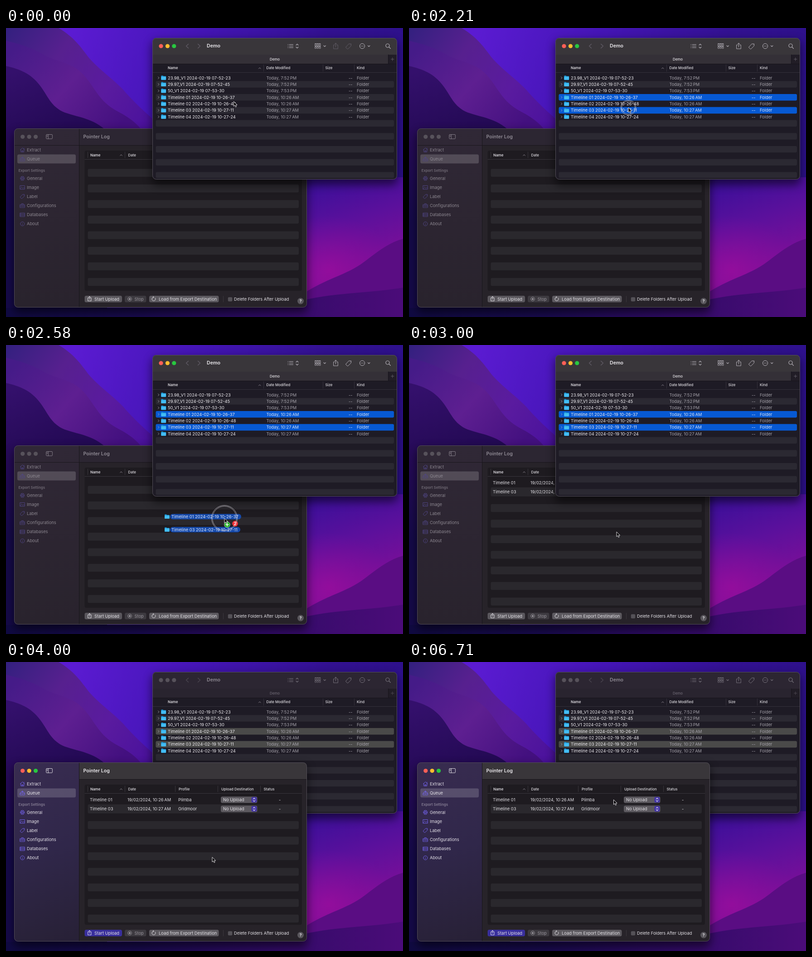
Write an HTML page that moves like this. It is 876 by 639 pixels and loops after 6760 ms.

```html
<!DOCTYPE html>
<html lang="en">
<head>
<meta charset="utf-8">
<title>Drag folders into the queue</title>
<style>
html, body { margin: 0; width: 100%; height: 100%; overflow: hidden; background: #1a0d55; }
svg { display: block; width: 876px; height: 639px; }
text { font-family: Inter, "Open Sans", sans-serif; font-size: 9.3px; white-space: pre; }
.h { font-size: 7.9px; font-weight: 500; fill: #dedce1; }
.b { font-weight: 600; }
.ln { fill: none; stroke-linecap: round; stroke-linejoin: round; }

.win { --title: #8f8a94; --bar: #2c2632; --r: #57525b; --y: #57525b; --g: #57525b; }
.win.on { --title: #eceaee; --bar: #39363a; --r: #fe5f57; --y: #febc2e; --g: #28c840; }
.title { fill: var(--title); font-weight: 600; font-size: 10.6px; }

.finder { --tool: #77727c; --dim: #4c4751; --tab: #6b6671; --tabbar: #29242f; --pick: #4a4a49; }
.finder.on { --tool: #b5b1b9; --dim: #615c66; --tab: #e6e4e8; --tabbar: #343037; --pick: #0759d3; }
.act { stroke: var(--dim); }
.picked .act { stroke: var(--tool); }
.pick { fill: var(--pick); visibility: hidden; }
.sel .pick { visibility: visible; }
.finder.on .sel .meta { fill: #d5e3fb; }
.meta { fill: #a5a2aa; }

.app { --side: url(#sideOff); --item: #8c8790; --icon: #514787; --btn: #5a575d; --rule: #19161c; --head: #706a75; }
.app.on { --side: url(#sideOn); --item: #e6e3ea; --icon: #7565f2; --btn: #392f9d; --rule: transparent; --head: #857d93; }
.icon { stroke: var(--icon); stroke-width: .9; }
</style>
</head>
<body>
<script>
(() => {
const LOOP = 6760;
const NS = 'http://www.w3.org/2000/svg';

function el(parent, tag, attrs = {}, content) {
  const node = document.createElementNS(NS, tag);
  for (const k in attrs) node.setAttribute(k, attrs[k]);
  if (content !== undefined) node.textContent = content;
  parent.append(node);
  return node;
}
const group = (p, cls = '') => el(p, 'g', { class: cls });
const box = (p, x, y, w, h, fill, rx = 0, more = {}) =>
  el(p, 'rect', { x, y, width: w, height: h, fill, rx, ...more });
const dot = (p, cx, cy, r, fill, more = {}) => el(p, 'circle', { cx, cy, r, fill, ...more });
const line = (p, d, stroke, width = 1, cls = 'ln') =>
  el(p, 'path', { d, class: cls, stroke, 'stroke-width': width });
// y is the middle of the capitals
const text = (p, x, y, str, fill = '#e4e2e7', cls = '', more = {}) =>
  el(p, 'text', { x, y: y + (cls === 'h' ? 2.9 : 3.4), fill, class: cls, ...more }, str);

const svg = el(document.body, 'svg', { viewBox: '0 0 876 639' });
const defs = el(svg, 'defs');

function gradient(id, [x1, y1, x2, y2], ...colours) {
  const g = el(defs, 'linearGradient', { id, x1, y1, x2, y2, gradientUnits: 'userSpaceOnUse' });
  colours.forEach((c, i) => el(g, 'stop', { offset: i / (colours.length - 1), 'stop-color': c }));
}
gradient('sky', [150, 0, 876, 300], '#5b1bd2', '#4415b5', '#321190', '#2b1088');
gradient('ridge', [0, 0, 320, 220], '#33207f', '#57208f', '#5a1b9f', '#49119c');
gradient('fold', [20, 40, 240, 230], '#451b88', '#5e1f91', '#43107f');
gradient('dark', [0, 100, 100, 400], '#34106c', '#240a55', '#150a49');
gradient('right', [700, 330, 800, 639], '#390f99', '#5b109c', '#7d0f98', '#480b75');
gradient('base', [0, 0, 876, 0], '#100a42', '#190b50', '#310b67', '#4b0c79');
gradient('sideOff', [0, 222, 0, 618], '#302836', '#29232d');
gradient('sideOn', [18, 222, 120, 618], '#382c50', '#30274a', '#282137');
const glow = el(defs, 'radialGradient', { id: 'glow' });
el(glow, 'stop', { offset: 0, 'stop-color': '#990d9d', 'stop-opacity': .8 });
el(glow, 'stop', { offset: 1, 'stop-color': '#8a0d9b', 'stop-opacity': 0 });
el(el(defs, 'filter', { id: 'soft', x: '-20%', y: '-20%', width: '140%', height: '140%' }),
  'feGaussianBlur', { stdDeviation: 10 });

function drawWallpaper() {
  const p = group(svg);
  const hill = (d, fill) => el(p, 'path', { d, fill });
  box(p, 0, 0, 876, 639, 'url(#sky)');
  hill('M0 0H116C150 20 165 42 183 66C212 98 236 112 260 138C284 166 304 183 340 216V260H0Z', 'url(#ridge)');
  hill('M0 28C42 38 65 48 88 62C124 78 151 78 176 109C198 136 206 161 242 182C274 199 291 211 310 240H0Z', 'url(#fold)');
  hill('M0 84C31 91 55 101 74 126C93 150 98 174 130 187C165 199 190 199 223 228V639H0Z', 'url(#dark)');
  hill('M640 330H876V639H640Z', 'url(#right)');
  el(p, 'ellipse', { cx: 712, cy: 535, rx: 150, ry: 120, fill: 'url(#glow)' });
  hill('M640 598C705 552 749 548 789 518C822 493 844 475 876 466V639H640Z', '#5a0d83');
  hill('M0 619C310 617 520 627 664 600C735 585 803 586 876 574V639H0Z', 'url(#base)');
}

function shadow(p, x, y, w, h) {
  box(p, x - 1, y + 7, w + 2, h + 5, '#000', 10, { filter: 'url(#soft)', opacity: .55 });
}
function lights(p, x, y) {
  ['r', 'y', 'g'].forEach((c, i) => dot(p, x + 14.4 * i, y, 4.6, `var(--${c})`));
}
function folder(p, x, y) {
  el(p, 'path', { d: `M${x} ${y - 4}q0-1 1-1h3l1.2 1.2h4.6q1 0 1 1v6q0 1-1 1h-8.8q-1 0-1-1Z`, fill: '#1b93d2' });
  box(p, x, y - 2.6, 10.8, 7.1, '#43bdf4', 1);
}
// the first heading is the sorted column
function headings(p, y, cols) {
  cols.forEach(([s, x], i) => text(p, x, y, s, '', 'h', i ? {} : { style: 'font-weight:600' }));
}

const folders = [
  ['23.98_V1 2024-02-19 07-52-23', '7:52'],
  ['29.97_V1 2024-02-19 07-52-45', '7:52'],
  ['50_V1 2024-02-19 07-53-30', '7:53'],
  ['Timeline 01 2024-02-19 10-26-37', '10:26'],
  ['Timeline 02 2024-02-19 10-26-48', '10:26'],
  ['Timeline 03 2024-02-19 10-27-11', '10:27'],
  ['Timeline 04 2024-02-19 10-27-24', '10:27']
];

function drawFinder() {
  const p = group(svg, 'win finder on');
  shadow(p, 323, 22, 540, 313);
  box(p, 323.5, 22, 539, 312.5, '#1e1b25', 8);
  el(p, 'path', { d: 'M324 79V30q0-8 8-8H854q8 0 8 8V79Z', fill: 'var(--bar)' });
  box(p, 324, 59, 519, 20, 'var(--tabbar)');
  box(p, 843.5, 59, 18.5, 20, '#211d26');
  line(p, 'M324 79.5H862M843.5 59V79', '#17141b');
  lights(p, 342, 40);
  text(p, 443, 40, 'Demo', '', 'title');
  text(p, 593, 69, 'Demo', '', 'h', { 'text-anchor': 'middle', style: 'fill:var(--tab)' });

  const tool = d => line(p, d, 'var(--tool)', 1.1);
  line(p, 'M402.5 35.5L397.5 40L402.5 44.5M423.5 35.5L428.5 40L423.5 44.5', 'var(--dim)', 1.3);
  tool('M622 36.5h.5M625 36.5h8.5M622 40h.5M625 40h8.5M622 43.5h.5M625 43.5h8.5');
  tool('M640 38l2.5-2.5 2.5 2.5M640 42l2.5 2.5 2.5-2.5');
  tool('M681.5 34.5h12.5M681.5 40.5h12.5');
  for (let i = 0; i < 6; i++) {
    box(p, 681.5 + i % 3 * 4.7, i < 3 ? 36 : 42, 3.2, 3.2, 'none', .8, { stroke: 'var(--tool)', 'stroke-width': .9 });
  }
  tool('M701 39l2.2 2.2 2.2-2.2M798.5 39l2.2 2.2 2.2-2.2');
  line(p, 'M725 37.5h-2.3v8.5h9.6v-8.5h-2.3M727.5 42v-8.5M725 35.7l2.5-2.5 2.5 2.5', '', 1, 'ln act');
  line(p, 'M750 42l6.5-7h5v4.5l-6.8 6.8q-.8.6-1.5 0l-3.2-3Q749.4 42.7 750 42ZM759.3 37.3v.1', '', 1, 'ln act');
  dot(p, 786, 40, 5.6, 'none', { stroke: 'var(--tool)' });
  for (const x of [783.4, 786, 788.6]) dot(p, x, 40, .8, 'var(--tool)');
  dot(p, 842, 39, 4, 'none', { stroke: 'var(--tool)', 'stroke-width': 1.2 });
  tool('M845 42l3.5 3.5');
  line(p, 'M849.5 69h6.5M852.75 65.8v6.5', 'var(--dim)');

  headings(p, 88.5, [['Name', 357], ['Date Modified', 574.5], ['Size', 704.5], ['Kind', 774]]);
  line(p, 'M557.5 90l2.3-2.3 2.3 2.3', '#9a969f', .9);
  line(p, 'M568.5 81V96M699.5 81V96M768.5 81V96M324 98.5H862', '#35313b');

  const rows = [];
  for (let i = 0; i < 16; i++) {
    const y = 110.2 + 14.36 * i;
    const g = group(p);
    if (i % 2) box(g, 330.5, y - 7.2, 525.5, i > 14 ? 13 : 14.4, '#2b2932', 3);
    if (i >= folders.length) continue;
    rows.push(g);
    const [name, time] = folders[i];
    el(g, 'rect', { x: 330.5, y: y - 7.2, width: 525.5, height: 14.4, rx: 3, class: 'pick' });
    line(g, `M335.5 ${y - 2.3}l2.3 2.3-2.3 2.3`, '#aaa7b0', .9);
    folder(g, 342.3, y);
    text(g, 357, y, name, '#f0eef2');
    text(g, 574.5, y, `Today, ${time}\u2009${i < 3 ? 'PM' : 'AM'}`, '', 'meta');
    text(g, 756, y, '--', '', 'meta');
    text(g, 774, y, 'Folder', '', 'meta');
  }
  box(p, 323.5, 22.5, 539, 312, 'none', 8, { stroke: '#5a5560', 'stroke-width': .9 });
  return { node: p, rows };
}

// icons are centred on 0,0
const sidebar = [
  ['Extract', 269.5, 'M-5 0L0-4.5L5 0M-3.5-1V4.5H3.5V-1M-1 4.5V1.5H1V4.5M3.5-4V-2'],
  ['Queue', 290, 'M-5 0L-3-2.5H3L5 0V4H-5ZM-5 .5H-2Q0 3 2 .5H5M0-.5V-5M-1.5-3.5L0-5L1.5-3.5'],
  ['General', 332.5, 'M-4.5 0a4.5 4.5 0 1 0 9 0a4.5 4.5 0 1 0-9 0M-2 0a2 2 0 1 0 4 0a2 2 0 1 0-4 0M-4 0H-2M2 0H4M1-1.7L2.2-3.8M1 1.7L2.2 3.8M-1-1.7L-2.2-3.8M-1 1.7L-2.2 3.8'],
  ['Image', 352.5, 'M-5-4H5V4H-5ZM-5 3L-1.5-.5L1 2L3 0L5 2M-2.5-2V-1.9'],
  ['Label', 372.5, 'M-4.8 1L.5-4.5H4.5V-.5L-1 4.5Q-1.5 5-2 4.5L-4.8 2Q-5 1.5-4.8 1M2.6-2.5V-2.4'],
  ['Configurations', 393, 'M-5-2.5H5V4H-5ZM-2-2.5V-4.5H2V-2.5M-5 .5H5M-1.5-.2V1.2M1.5-.2V1.2'],
  ['Databases', 413, 'M-5-4H5V4H-5ZM-5-1.3H5M-5 1.3H5M-3.5-2.6V-2.5M-3.5 0V.1M-3.5 2.6V2.7'],
  ['About', 433, 'M-4.5 0a4.5 4.5 0 1 0 9 0a4.5 4.5 0 1 0-9 0M0-2V-1.9M0 0V2.3']
];
const jobs = [
  ['Timeline 01', '19/02/2024, 10:26\u2009AM', 'Plimba'],
  ['Timeline 03', '19/02/2024, 10:27\u2009AM', 'Gridmoor']
];

function stripes(p, y) {
  for (; y < 575; y += 34.46) box(p, 180.5, y - 8.7, 465.5, 17.4, '#2a282d', 3);
}

function drawApp() {
  const p = group(svg, 'win app');
  shadow(p, 18, 222, 646, 396);
  box(p, 18.5, 222.5, 645, 395, '#272329', 8);
  el(p, 'path', { d: 'M161.5 222.5V617.5H26.5q-8 0-8-8V230.5q0-8 8-8Z', fill: 'var(--side)' });
  el(p, 'path', { d: 'M161.5 259.5V222.5H655.5q8 0 8 8V259.5Z', fill: 'var(--bar)' });
  line(p, 'M161.5 223V617M162 259.5H663', '#18151b');
  line(p, 'M19 259.5H161', 'var(--rule)');
  lights(p, 36.7, 240.5);
  line(p, 'M90 235.5H101Q102.3 235.5 102.3 237V243.5Q102.3 245 101 245H90Q88.7 245 88.7 243.5V237Q88.7 235.5 90 235.5M93.3 235.5V245M90.3 238H91.7M90.3 240H91.7', 'var(--title)', .9);
  text(p, 170.5, 240.5, 'Pointer Log', '', 'title');

  box(p, 25, 279.5, 129, 20, '#fff', 3.5, { opacity: .17 });
  for (const [name, y, d] of sidebar) {
    el(p, 'path', { d, class: 'ln icon', transform: `translate(36.2 ${y})` });
    text(p, 46, y, name, 'var(--item)');
  }
  text(p, 27.5, 315.5, 'Export Settings', '', 'h', { style: 'fill:var(--head);font-weight:600' });

  box(p, 173.5, 271, 479.5, 310, '#1e1b20', 4);
  headings(p, 281, [['Name', 186], ['Date', 269.5], ['Profile', 381], ['Upload Destination', 475], ['Status', 568.5]]);
  line(p, 'M251.8 282.3l2.3-2.3 2.3 2.3', '#9a969f', .9);
  line(p, 'M180.5 274V287M262.5 274V287M373.5 274V287M467.5 274V287M561.5 274V287M174 290.5H653', '#3a373d');

  const empty = group(p);
  stripes(empty, 320.3);
  const filled = group(p);
  box(filled, 180.5, 314.8, 465.5, 20, '#2a282d', 3);
  stripes(filled, 360.5);
  jobs.forEach(([name, date, profile], i) => {
    const y = 304.7 + 20.1 * i;
    text(filled, 185, y, name);
    text(filled, 268, y, date);
    text(filled, 380, y, profile);
    box(filled, 474, y - 7.3, 80.5, 14.4, '#5c595f', 3.5);
    box(filled, 541.5, y - 6.2, 12, 12.2, '#4132a4', 3);
    line(filled, `M545.3 ${y - 1.5}l2.2-2.2 2.2 2.2M545.3 ${y + 1.5}l2.2 2.2 2.2-2.2`, '#f1eff5', 1.1);
    text(filled, 479, y - .3, 'No Upload');
    text(filled, 602, y, '-');
  });

  box(p, 173.5, 592, 82.5, 14.4, 'var(--btn)', 3.5);
  line(p, 'M182.5 596.5h-1.8v7h7.2v-7h-1.8M184.3 600v-6.3M182.5 595.3l1.8-1.8 1.8 1.8', '#f0eef2', .9);
  text(p, 195, 599.2, 'Start Upload');
  box(p, 262, 592, 47.5, 14.4, '#3d3a40', 3.5);
  dot(p, 273, 599.2, 4.3, 'none', { stroke: '#a19da4', 'stroke-width': .9 });
  box(p, 271.2, 597.4, 3.6, 3.6, '#a19da4', .6);
  text(p, 283.5, 599.2, 'Stop', '#99959c');
  box(p, 316, 592, 153.5, 14.4, '#5c595f', 3.5);
  line(p, 'M329.3 597a4 4 0 1 1-3.5-1.8M324.5 593.3l1.8 1.9-1.8 1.9', '#f0eef2', .9);
  text(p, 337, 599.2, 'Load from Export Destination');
  line(p, 'M479.5 593V606', '#3c383f');
  box(p, 489.8, 595.2, 9.4, 9.4, '#545157', 2);
  text(p, 503, 600, 'Delete Folders After Upload');
  dot(p, 650, 603.8, 7, '#59565c');
  text(p, 650, 603.8, '?', '#f0eef2', 'b', { 'text-anchor': 'middle' });
  box(p, 18.5, 222.5, 645, 395, 'none', 8, { stroke: '#57525c', 'stroke-width': .9 });
  return { node: p, empty, filled };
}

// drawn around the pointer tip
function drawDrag(parent) {
  const p = group(parent);
  const ghosts = group(p);
  [[3, -3.5, 157], [5, 25.2, 155]].forEach(([i, y, w]) => {
    box(ghosts, -120, y - 6, w, 12, '#1450bd', 6, { opacity: .88 });
    folder(ghosts, -132, y);
    text(ghosts, -117, y, folders[i][0], '#dfe8fb');
  });
  dot(p, 23.5, 12, 6.3, '#f02f35');
  text(p, 23.5, 12, '2', '#fff', 'b', { 'text-anchor': 'middle' });
  const plus = group(p);
  dot(plus, 6, 14.3, 6.3, '#24b324', { stroke: '#e8f5e8', 'stroke-width': .6 });
  line(plus, 'M2.8 14.3H9.2M6 11.1V17.5', '#fff', 1.5);
  return { node: p, ghosts, plus };
}

drawWallpaper();
const app = drawApp();
const finder = drawFinder();
const overlay = group(svg);
const drag = drawDrag(overlay);
const ring = group(overlay);
const rings = [0, 2].map(() => dot(ring, 0, 0, 0, 'none', { stroke: '#d8d5dc', 'stroke-width': .8 }));
const arrow = el(overlay, 'path', {
  d: 'M0 0V10.6L2.5 8.3L4.2 12.2L6 11.4L4.4 7.6H7.7Z',
  fill: '#08070a', stroke: '#f4f2f5', 'stroke-width': .9, 'stroke-linejoin': 'round'
});

const ease = {
  smooth: k => k * k * (3 - 2 * k),
  out: k => 1 - (1 - k) * (1 - k),
  flat: k => k
};
// time, x, y of the pointer tip, easing of the way there
const path = [
  [0, 502.5, 162.5], [40, 502.5, 162.5], [600, 485, 152], [780, 485, 152], [1150, 484, 176],
  [2220, 484, 176], [2560, 482, 383], [2630, 482, 383], [3000, 458, 413, 'flat'],
  [3290, 455, 431.5, 'out'], [4040, 455, 431.5], [4750, 443, 352],
  [4790, 443, 352], [5130, 441, 300, 'out'], [5340, 441, 300], [5750, 444, 318.5],
  [5880, 444, 318.5], [6170, 451.5, 304.5], [LOOP, 451.5, 304.5]
];
const presses = [[560, 640], [1180, 1260], [2100, 2640], [3440, 3560]];
const PICK_A = 580, PICK_B = 1200, LIFT = 2250, DROP = 2640, LISTED = 2690, SWITCH = 3480;
const clamp = k => Math.max(0, Math.min(1, k));

function pointer(t) {
  const i = path.findIndex((s, n) => n && t <= s[0]);
  const [t0, x0, y0] = path[i - 1];
  const [t1, x1, y1, kind = 'smooth'] = path[i];
  const k = ease[kind]((t - t0) / (t1 - t0));
  return [x0 + (x1 - x0) * k, y0 + (y1 - y0) * k];
}

const show = (node, on) => node.setAttribute('visibility', on ? 'inherit' : 'hidden');

let front = finder.node;
function render(t) {
  const [x, y] = pointer(t);
  const appOn = t >= SWITCH;
  const want = appOn ? app.node : finder.node;
  if (want !== front) {
    svg.insertBefore(want, overlay);
    front = want;
  }
  app.node.classList.toggle('on', appOn);
  finder.node.classList.toggle('on', !appOn);
  finder.node.classList.toggle('picked', t >= PICK_A);
  finder.rows[3].classList.toggle('sel', t >= PICK_A);
  finder.rows[5].classList.toggle('sel', t >= PICK_B);
  show(app.empty, t < LISTED);
  show(app.filled, t >= LISTED);

  show(drag.node, t >= LIFT && t < DROP);
  show(drag.plus, y > 336);
  const settle = 1 - clamp((t - LIFT) / 180);
  drag.ghosts.setAttribute('transform', `translate(${-10 * settle} ${-20 * settle})`);

  const press = presses.find(([down, up]) => t >= down && t < up + 150);
  show(ring, press);
  if (press) {
    const r = 28.5 * clamp((t - press[0]) / 190);
    rings.forEach((c, i) => c.setAttribute('r', Math.max(0, r - 2 * i)));
    ring.setAttribute('opacity', .85 * (1 - clamp((t - press[1]) / 150)));
  }
  const at = `translate(${x} ${y})`;
  for (const node of [drag.node, ring, arrow]) node.setAttribute('transform', at);
}

const start = performance.now();
function tick() {
  render((performance.now() - start) % LOOP);
  requestAnimationFrame(tick);
}
render(0);
requestAnimationFrame(tick);
})();
</script>
</body>
</html>
```
